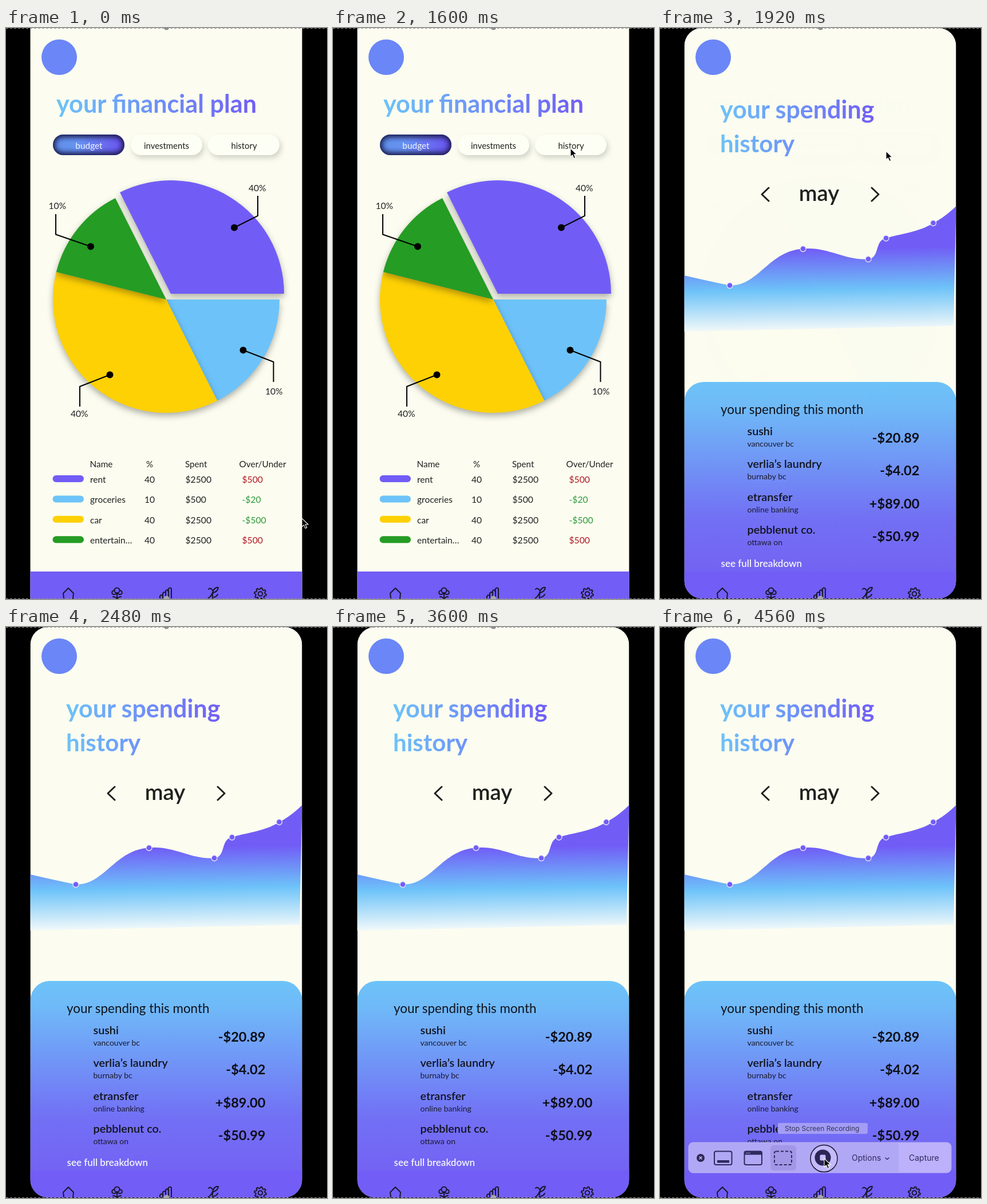
An HTML page that plays this animation: 561 by 997 pixels, repeating every 4640 ms.

```html
<!DOCTYPE html>
<html lang="en">
<head>
<meta charset="utf-8">
<title>Budget app prototype</title>
<style>
  html, body { margin: 0; width: 100%; height: 100%; overflow: hidden; background: #000; }
  svg { display: block; width: 100%; height: 100%; }
  text { font-family: Lato, "Open Sans", sans-serif; white-space: pre; }
  .ui text { font-family: Inter, Roboto, sans-serif; }
  .slice { filter: drop-shadow(0 5px 6px rgba(0, 0, 0, .32)); }
  .pill { filter: drop-shadow(3px 5px 5px rgba(0, 0, 0, .17)); }
</style>
</head>
<body>
<svg viewBox="0 0 561 997" preserveAspectRatio="none">
  <defs>
    <linearGradient id="title1" gradientUnits="userSpaceOnUse" x1="89" x2="440" y1="0" y2="0">
      <stop stop-color="#6dc3f9"/><stop offset="1" stop-color="#715df6"/>
    </linearGradient>
    <linearGradient id="title2" gradientUnits="userSpaceOnUse" x1="106" x2="378" y1="0" y2="0">
      <stop stop-color="#6dc3f9"/><stop offset="1" stop-color="#715df6"/>
    </linearGradient>
    <linearGradient id="area" gradientUnits="userSpaceOnUse" x1="280" x2="282" y1="385" y2="528">
      <stop stop-color="#715df6"/><stop offset=".5" stop-color="#6dc3f9"/>
      <stop offset="1" stop-color="#f4fafa"/>
    </linearGradient>
    <linearGradient id="panel" gradientUnits="userSpaceOnUse" x1="0" x2="0" y1="618" y2="949">
      <stop stop-color="#6dc3f9"/><stop offset=".14" stop-color="#6fb9f8"/>
      <stop offset=".72" stop-color="#7270f5"/><stop offset="1" stop-color="#7463f4"/>
    </linearGradient>
    <linearGradient id="tab">
      <stop stop-color="#5f8fe6"/><stop offset=".35" stop-color="#6793f3"/>
      <stop offset="1" stop-color="#6a50ee"/>
    </linearGradient>
    <filter id="soft" x="-20%" y="-60%" width="140%" height="220%"><feGaussianBlur stdDeviation="4"/></filter>
    <clipPath id="tabClip"><rect x="82" y="186" width="125" height="36" rx="18"/></clipPath>
    <clipPath id="phone"><rect x="42.5" y="0" width="475" height="996" rx="31"/></clipPath>
    <g id="logo"><circle cx="93" cy="51" r="31" fill="#6b86f7"/></g>
    <g id="nav">
      <rect x="42.5" y="949" width="475" height="48" fill="#725df6"/>
      <g fill="none" stroke="#191830" stroke-width="2" stroke-linejoin="round" stroke-linecap="round">
        <path d="M101 1000v-4l-1-9 9-9 9 9-1 9v4"/>
        <circle cx="194" cy="982" r="4.5"/>
        <path d="M189 982c-5 1-5 7 0 7q3 0 5-3q2 3 5 3c5 0 5-6 0-7M194 987v12M187 993q5 0 7 5q2-5 7-5"/>
        <path d="M269 1000v-8q3-4 5 0v-5q3-4 5 0v-4q2-4 4 0l1-4q3-3 5 0v21M274 992v8M279 988v8M284 982v14"/>
        <path d="M354 980q3-4 8 3q3-7 9-6q-1 7-9 9q-2 4-1 11M362 983q-2 8-9 13M363 994q5-1 7-5"/>
        <circle cx="444.500" cy="988" r="3.800"/>
        <path id="gear"/>
      </g>
    </g>
  </defs>
  <g id="plan"></g>
  <g id="history"></g>
  <g id="bar" class="ui">
    <rect x="50" y="900" width="459" height="53" rx="8" fill="#b1a8f5" stroke="#c2bbf7" stroke-width=".8"/>
    <path d="M417 901H501q7 0 7 7v37q0 7-7 7H417Z" fill="#bcb1fa"/>
    <rect x="193" y="905" width="45" height="44" rx="6" fill="#a197e6"/>
    <circle cx="71" cy="927" r="7" fill="#2d2856"/>
    <path d="M68.500 924.500l5 5m0-5l-5 5" stroke="#c8c1fa" stroke-width="1.500"/>
    <g fill="none" stroke="#2f2a5f" stroke-width="2">
      <rect x="95" y="915.500" width="30.500" height="23.500" rx="3"/>
      <rect x="147.500" y="915.500" width="30.500" height="23.500" rx="3"/>
      <rect x="200" y="915.500" width="30" height="23.500" rx="3" stroke-dasharray="5 3"/>
      <path d="M393.500 926.500l3.500 3 3.500-3" stroke-width="1.500"/>
    </g>
    <path d="M100 931h21v4.500h-21ZM148 916h30v5.500h-30Z" fill="#2f2a5f"/>
    <path d="M150.500 918.500h7" stroke="#b1a8f5" stroke-width="1.500" stroke-dasharray="1.500 1.200"/>
    <g id="ring">
      <circle cx="286.500" cy="928" r="23.500" fill="#c3bbfa" stroke="#17152b" stroke-width="1.500"/>
      <rect x="206" y="866" width="157" height="19" rx="3" fill="#a39df5"/>
      <text x="218" y="879.500" font-size="12" fill="#38355c">Stop Screen Recording</text>
    </g>
    <circle cx="284.500" cy="926.500" r="14" fill="#2b2655"/>
    <rect x="279.500" y="921.500" width="10" height="10" rx="2" fill="#c6bffa"/>
    <text x="335" y="932" font-size="14" fill="#2f2a5f">Options</text>
    <text x="435" y="932" font-size="14" fill="#2f2a5f">Capture</text>
  </g>
  <g stroke="#8f8f8f" stroke-dasharray="4 3"><path d="M0 .5H561M0 996.500H561"/></g>
  <circle cx="280.500" cy="-1" r="4.500" fill="#8b8b90"/>
  <circle cx="280.500" cy="996.500" r="5" fill="#a5a5ab"/>
  <path id="arrow" d="M0 0v15l3.500-3.200 2.600 5.800 2.700-1.200-2.600-5.600h4.900Z" fill="#000" stroke="#fff" stroke-width="1.100"/>
  <path id="hand" d="M-3 9Q-7 4-8 0Q-7-2-4 1L-6-6Q-4-9-2-5L-2-8Q0-10 1-7L2-1L3-7Q5-9 6-6L5 0L7-3Q9-4 9-2L6 5L5 9Z"
    fill="#fff" stroke="#222" stroke-width="1.200" stroke-linejoin="round"/>
</svg>
<script>
const $ = id => document.getElementById(id);
const INK = '#20211e', CREAM = '#fcfdf0';
const PURPLE = '#715df6', BLUE = '#6dc3f9', YELLOW = '#fed105', GREEN = '#259c24';
const RED = '#b0161f', UNDER = '#2e9838';

const text = (x, y, str, size, fill = INK, more = '') =>
  `<text x="${x}" y="${y}" font-size="${size}" fill="${fill}" ${more}>${str}</text>`;
const box = (x, y, w, h, r, fill, more = '') =>
  `<rect x="${x}" y="${y}" width="${w}" height="${h}" rx="${r}" fill="${fill}" ${more}/>`;
const bold = 'font-weight="700"', semi = 'font-weight="600"', mid = 'text-anchor="middle"';

function slice(cx, cy, from, to, fill) {
  const at = deg => {
    const a = deg * Math.PI / 180;
    return `${cx + 198 * Math.cos(a)} ${cy + 198 * Math.sin(a)}`;
  };
  const big = to - from > 180 ? 1 : 0;
  return `<path class="slice" fill="${fill}" d="M${cx} ${cy}L${at(from)}A198 198 0 ${big} 1 ${at(to)}Z"/>`;
}

function callout(x, y, endX, bendY, endY, label, labelX, labelY) {
  return `<path d="M${x} ${y}L${endX} ${bendY}V${endY}" fill="none" stroke="#000" stroke-width="2"/>` +
    `<circle cx="${x}" cy="${y}" r="6"/>` + text(labelX, labelY, label, 15.6);
}

function gearPath() {
  let d = '';
  for (let i = 0; i < 32; i++) {
    const a = (i + .5) * Math.PI / 16, r = i % 4 < 2 ? 10.5 : 8;
    d += `${i ? 'L' : 'M'}${444.5 + r * Math.cos(a)} ${988 + r * Math.sin(a)}`;
  }
  return d + 'Z';
}

function planPage() {
  const rows = [
    ['rent', 40, '$2500', '$500', PURPLE, RED],
    ['groceries', 10, '$500', '-$20', BLUE, UNDER],
    ['car', 40, '$2500', '-$500', YELLOW, UNDER],
    ['entertain…', 40, '$2500', '$500', GREEN, RED]
  ];
  const table = rows.map(([name, pct, spent, diff, color, tone], i) => {
    const y = 794 + i * 35.4;
    return box(81.5, y - 13, 54.5, 12, 6, color) + text(147, y, name, 15.5) +
      text(242, y, pct, 15.6) + text(313.5, y, spent, 15.7) + text(412.5, y, diff, 15.7, tone);
  }).join('');
  return box(42.5, 0, 475, 997, 0, CREAM) + '<use href="#logo"/>' +
    text(88, 148, 'your financial plan', 43.2, 'url(#title1)', bold) +
    box(82, 186, 125, 36, 18, 'url(#tab)') +
    `<g clip-path="url(#tabClip)">${box(80, 185, 129, 38, 19, 'none',
      'stroke="#1c1f50" stroke-width="12" filter="url(#soft)"')}</g>` +
    box(218, 186, 125, 36, 18, '#fdfef4', 'class="pill"') +
    box(353, 186, 125, 36, 18, '#fdfef4', 'class="pill"') +
    text(145, 211, 'budget', 15.4, '#f1f3fa', mid) +
    text(280.5, 211, 'investments', 14.9, INK, mid) +
    text(416, 211, 'history', 14.9, INK, mid) +
    slice(288, 464, 243.3, 360, PURPLE) + slice(280, 474, 0, 63.2, BLUE) +
    slice(280, 474, 63.2, 194, YELLOW) + slice(280, 474, 194, 243.3, GREEN) +
    callout(399, 348.5, 440, 328, 293, '40%', 424, 285) +
    callout(148, 381.5, 87, 360.5, 325, '10%', 74.5, 316) +
    callout(414.5, 562.5, 467.5, 583, 618, '10%', 453, 640) +
    callout(181.5, 605.5, 129, 626, 661, '40%', 113, 679) +
    text(146.5, 767, 'Name', 15.4) + text(245, 767, '%', 15) +
    text(313, 767, 'Spent', 15.2) + text(407.5, 767, 'Over/Under', 15.4) +
    table + '<use href="#nav"/>';
}

function historyPage() {
  const items = [
    ['sushi', 'vancouver bc', '-$20.89'],
    ['verlia’s laundry', 'burnaby bc', '-$4.02'],
    ['etransfer', 'online banking', '+$89.00'],
    ['pebblenut co.', 'ottawa on', '-$50.99']
  ];
  const list = items.map(([name, place, sum], i) => {
    const y = 711 + i * 57.4;
    return text(152.5, y, name, 19.8, '#11121c', semi) + text(152.5, y + 20, place, 14, '#1a1b30') +
      text(453.5, y + 13, sum, 23.6, '#0d0e16', bold + ' text-anchor="end"');
  }).join('');
  const dots = [[122, 449.5], [250, 385.5], [364, 403.5], [395, 367], [477.5, 340.5]]
    .map(([x, y]) => `<circle cx="${x}" cy="${y}" r="5" fill="${PURPLE}" stroke="#e9e8fb" stroke-width="1.3"/>`).join('');
  return box(0, 0, 561, 997, 0, '#000') + '<g clip-path="url(#phone)">' +
    box(42.5, 0, 475, 997, 0, CREAM) + '<use href="#logo"/>' +
    text(105, 158, 'your spending', 43, 'url(#title2)', bold) +
    text(105, 217, 'history', 42, 'url(#title2)', bold) +
    text(278, 301.5, 'may', 38.4, INK, mid + ' ' + semi) +
    `<path d="M190 279L178 290.500L190 302M370 279L382 290.500L370 302" fill="none" stroke="${INK}" stroke-width="3" stroke-linecap="round" stroke-linejoin="round"/>` +
    `<path fill="url(#area)" d="M42 432Q90 443 122 449.500C172 451 190 389 250 385.500C292 381 322 406 364 403.500
      C385 401 374 371 395 367C420 359 452 357 477.500 340.500Q497 331 517.500 311L513 520L42 530Z"/>` + dots +
    box(42.5, 618, 475, 400, 34, 'url(#panel)') +
    text(106, 674, 'your spending this month', 22.4, '#11121c') + list +
    text(106.5, 941, 'see full breakdown', 17, '#f4f5fb', semi) +
    '<use href="#nav"/></g>';
}

$('gear').setAttribute('d', gearPath());
$('plan').innerHTML = planPage();
$('history').innerHTML = historyPage();

const LOOP = 4640, STEP = 80;
const FADE_START = 1635, FADE_TIME = 300;
const BAR_AT = 4000, RING_AT = 4480;
const HAND_FROM = 3920, HAND_TO = 4200;
// Pointer stops: time, x, y
const moves = [
  [0, 517, 856], [160, 519, 850], [480, 500, 500], [800, 466, 214], [960, 464, 208],
  [1200, 455, 206], [1520, 415, 210], [1760, 415, 210], [1920, 395, 215], [2080, 405, 235],
  [2400, 585, 330], [3700, 200, 1020], [4080, 217, 852], [4400, 287, 928], [LOOP, 287, 928]
];

function pointer(t) {
  const i = moves.findIndex(m => m[0] > t);
  const [t0, x0, y0] = moves[i - 1], [t1, x1, y1] = moves[i];
  const k = (t - t0) / (t1 - t0), e = k * k * (3 - 2 * k);
  return [x0 + (x1 - x0) * e, y0 + (y1 - y0) * e];
}

const show = (id, on) => $(id).setAttribute('visibility', on ? 'inherit' : 'hidden');

function draw(now) {
  const t = Math.floor(now % LOOP / STEP) * STEP;
  const k = Math.min(1, Math.max(0, (t - FADE_START) / FADE_TIME));
  $('history').setAttribute('opacity', 1 - (1 - k) ** 1.75);
  $('bar').setAttribute('visibility', t >= BAR_AT ? 'visible' : 'hidden');
  show('ring', t >= RING_AT);

  const away = t >= 2400 && t < 3700, hand = t >= HAND_FROM && t < HAND_TO;
  const [x, y] = pointer(t);
  show('arrow', !away && !hand);
  show('hand', !away && hand);
  for (const id of ['arrow', 'hand']) $(id).setAttribute('transform', `translate(${x} ${y})`);
}

const start = performance.now();
function tick() {
  draw(performance.now() - start);
  requestAnimationFrame(tick);
}
tick();
</script>
</body>
</html>
```
